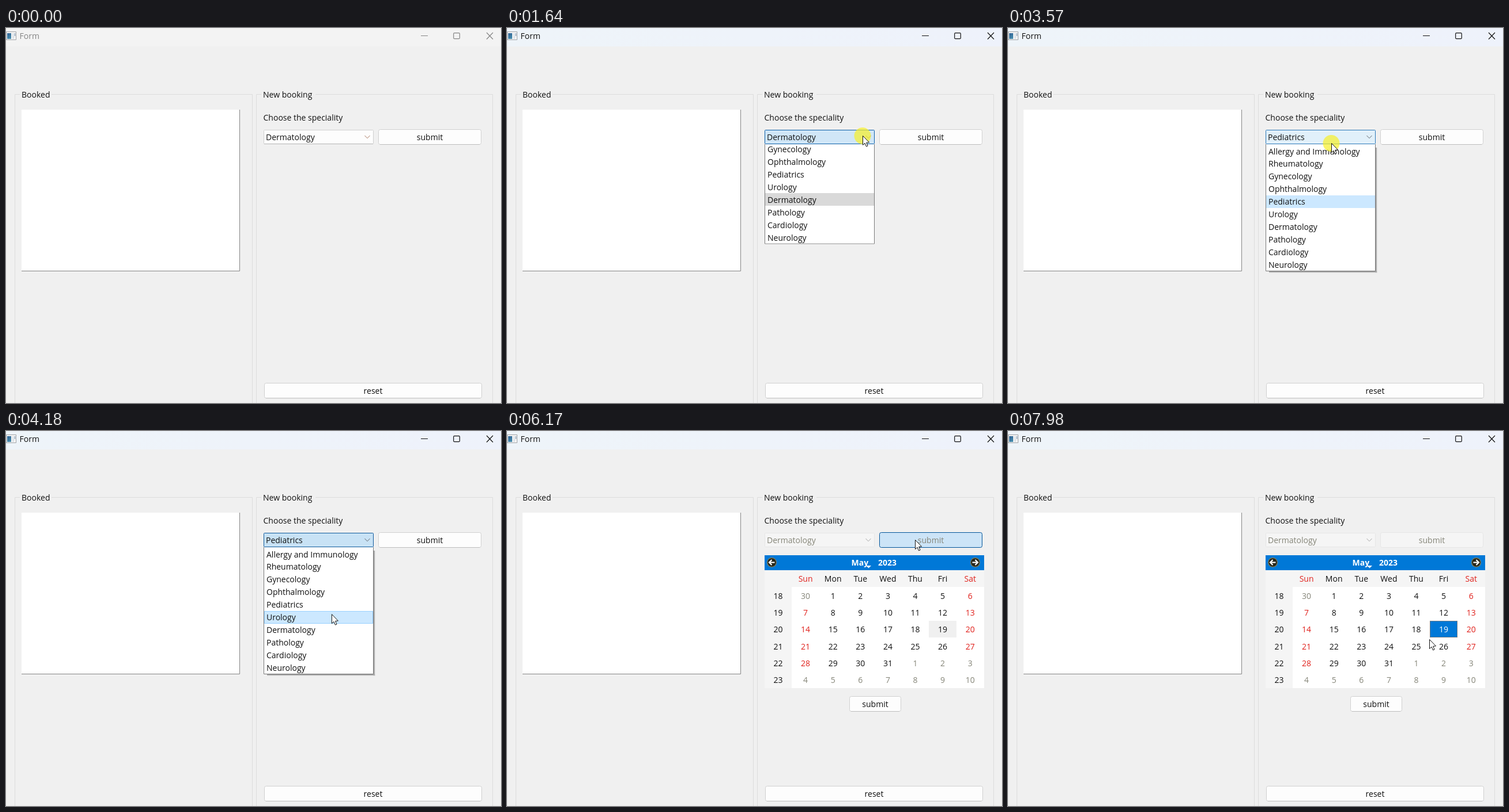
An HTML page with a canvas that plays this animation: 859 px wide and 652 px high, repeating every 8 s.

```html
<!DOCTYPE html>
<html lang="en">
<head>
<meta charset="utf-8">
<title>Booking form</title>
<style>
html, body { margin: 0; width: 100%; height: 100%; overflow: hidden; background: #f0f0f0; }
canvas { display: block; }
</style>
</head>
<body>
<canvas id="stage" width="859" height="652"></canvas>
<script>
const ctx = document.getElementById('stage').getContext('2d');
const LOOP = 8000;
const ITEMS = ['Allergy and Immunology', 'Rheumatology', 'Gynecology', 'Ophthalmology', 'Pediatrics',
  'Urology', 'Dermatology', 'Pathology', 'Cardiology', 'Neurology'];
const DAYS = ['Sun', 'Mon', 'Tue', 'Wed', 'Thu', 'Fri', 'Sat'];
const LIST_TOP = 203, LIST_H = 220, ROW_H = 21.95;
const CALENDAR_AT = 5930, SELECT_AT = 7530;

// Control looks: [fill, border]
const NORMAL = ['#fdfdfd', '#d0d0d0'];
const HOVER = ['#e0eef9', '#0078d4'];
const PRESSED = ['#cce4f7', '#005499'];
const OPEN = ['#c8e2f5', '#0f5a9c'];
const OFF = ['#f5f5f5', '#e6e6e6'];

const comboLook = [[0, NORMAL], [1230, NORMAL], [1360, HOVER], [1480, HOVER], [1640, ['#d0e6f7', '#0a5ea8']],
  [1850, OPEN], [2760, OPEN], [2950, NORMAL], [3170, NORMAL], [3300, HOVER], [3570, ['#e1f0fa', '#2a78b8']],
  [3720, OPEN], [5040, OPEN], [5200, ['#e0eef8', '#5a8fb8']], [5400, NORMAL], [5920, NORMAL], [5930, OFF]];
const submitLook = [[0, NORMAL], [5570, NORMAL], [5700, HOVER], [5800, HOVER], [5900, PRESSED], [6170, PRESSED], [6570, OFF]];
const resetLook = [[0, NORMAL], [600, NORMAL], [660, HOVER], [740, HOVER], [950, NORMAL]];

// Pointer path: [time, x, y]
const path = [[600, 735, 642], [1360, 617, 187], [1700, 617, 187], [2190, 568, 302], [2260, 568, 305],
  [2320, 568, 311], [2700, 568, 311], [3300, 561, 200], [3600, 561, 200], [4250, 565, 322], [4320, 565, 325],
  [4530, 567, 343], [5040, 567, 343], [5730, 708, 189], [6570, 708, 189], [7260, 756, 339], [7979, 756, 339], [7980, 731, 362]];
const clicks = [[1420, 1700], [2520, 2700], [3440, 3640], [4730, 4990], [5800, 6000], [7530, 7720]];
// Drop-down: [starts sliding, fully open, closes, selected item]
const menus = [[1484, 1684, 2760, 6], [3360, 3540, 5050, 4]];

const within = (t, [from, to]) => t >= from && t < to;

// Keys around time t and the progress between them
function span(keys, t) {
  const i = keys.findIndex(k => k[0] > t);
  if (i < 0) return [keys.at(-1), keys.at(-1), 0];
  if (i === 0) return [keys[0], keys[0], 0];
  const a = keys[i - 1], b = keys[i];
  return [a, b, (t - a[0]) / (b[0] - a[0])];
}

function mix(a, b, p) {
  const channel = (c, i) => parseInt(c.slice(i, i + 2), 16);
  return `rgb(${[1, 3, 5].map(i => Math.round(channel(a, i) * (1 - p) + channel(b, i) * p))})`;
}

function lookAt(keys, t) {
  const [a, b, p] = span(keys, t);
  return [0, 1].map(i => mix(a[1][i], b[1][i], p));
}

function pointerAt(t) {
  const [a, b, p] = span(path, t), e = p * p * (3 - 2 * p);
  return [a[1] + (b[1] - a[1]) * e, a[2] + (b[2] - a[2]) * e];
}

function rect(x, y, w, h, color) {
  ctx.fillStyle = color;
  ctx.fillRect(x, y, w, h);
}

function box(x, y, w, h, [fill, border], r = 0) {
  ctx.beginPath();
  ctx.roundRect(x + .5, y + .5, w - 1, h - 1, r);
  ctx.fillStyle = fill;
  ctx.fill();
  ctx.strokeStyle = border;
  ctx.stroke();
}

function line(color, ...pts) {
  ctx.beginPath();
  for (let i = 0; i < pts.length; i += 2) ctx.lineTo(pts[i], pts[i + 1]);
  ctx.strokeStyle = color;
  ctx.stroke();
}

function disc(x, y, r, color) {
  ctx.beginPath();
  ctx.arc(x, y, r, 0, 7);
  ctx.fillStyle = color;
  ctx.fill();
}

function text(s, x, y, color = '#111', align = 'left', weight = 400) {
  ctx.font = `${weight} 14px "Open Sans", "Noto Sans", sans-serif`;
  ctx.textAlign = align;
  ctx.fillStyle = color;
  ctx.fillText(s, x, y);
}

function button(label, x, y, w, h, look, color) {
  box(x, y, w, h, look, 3);
  if (look[1] === mix(NORMAL[1], NORMAL[1], 0)) line('#bdbdbd', x + 3, y + h - .5, x + w - 3, y + h - .5);
  text(label, x + w / 2, y + h / 2 + 5.5, color, 'center');
}

function titleBar(active) {
  const ink = active ? '#111' : '#858585';
  const shade = ctx.createLinearGradient(0, 0, 859, 0);
  shade.addColorStop(0, active ? '#eef4f9' : '#f3f3f3');
  shade.addColorStop(1, active ? '#eef2fb' : '#f3f3f3');
  rect(0, 0, 859, 32, shade);
  box(0, 6, 18, 15, ['#f4f4f4', '#a0a4a8']);
  const blue = ctx.createLinearGradient(2, 8, 9, 19);
  blue.addColorStop(0, '#2f5f94');
  blue.addColorStop(1, '#4b93b0');
  rect(2, 9, 7, 10, blue);
  rect(11, 9, 3, 10, '#dde3e8');
  rect(15, 9, 1, 5, '#6a8aa8');
  text('Form', 23.5, 19, ink);
  line(ink, 720, 13.5, 732, 13.5);
  ctx.lineWidth = 1.2;
  ctx.beginPath();
  ctx.roundRect(776.7, 8.7, 10.6, 10, 1.5);
  ctx.stroke();
  line(ink, 834, 8, 845, 19.5);
  line(ink, 845, 8, 834, 19.5);
  ctx.lineWidth = 1;
}

function group(label, left, right, gapEnd) {
  line('#dcdcdc', left + 9, 115.5, left + .5, 115.5, left + .5, 660);
  line('#dcdcdc', gapEnd, 115.5, right - .5, 115.5, right - .5, 660);
  text(label, left + 12, 121);
}

function combo(t, off) {
  const look = lookAt(comboLook, t);
  box(447, 177, 191, 25, look, 1);
  if (t < 1230) line('#b4b4b4', 448, 201.5, 637, 201.5);
  text(within(t, [2760, 5050]) ? ITEMS[4] : ITEMS[6], 451, 195, off ? '#858578' : '#111');
  line(off ? '#a8a8a8' : t < 1700 ? '#a87860' : '#606870', 622.5, 187, 627, 191.7, 631.5, 187);
}

function menu(t, py, [start, full, , selected]) {
  const shown = Math.min(1, (t - start) / (full - start)), sliding = shown < 1;
  const h = LIST_H * shown, top = LIST_TOP - LIST_H + h;
  const hovering = !sliding && py > LIST_TOP;
  const row = hovering ? Math.floor((py - LIST_TOP) / ROW_H) : selected;
  if (!sliding) {
    for (const [d, color] of [[2.5, '#d2d2d2'], [1.5, '#9c9c9c']]) {
      rect(453, 423, 185 + d, d, color);
      rect(638, 208, d, 215 + d, color);
    }
  }
  ctx.save();
  ctx.beginPath();
  ctx.rect(447, 202, 191, h + 1);
  ctx.clip();
  rect(447, 202, 191, h + 1, '#fff');
  const y = Math.round(top + row * ROW_H);
  rect(448, y, 189, 22, sliding ? '#d9d9d9' : '#cce8ff');
  if (hovering) box(448, y, 189, 22, ['#cce8ff', '#99d1ff']);
  ITEMS.forEach((name, i) => text(name, 452, Math.round(top + 16.5 + i * ROW_H)));
  line('#7a7a7a', 447.5, 202, 447.5, 202.5 + h, 637.5, 202.5 + h, 637.5, 202);
  ctx.restore();
}

function navButton(x, dir) {
  disc(x, 228.5, 8.5, '#85805a');
  disc(x, 228.5, 7.3, '#25261c');
  ctx.lineWidth = 2.2;
  line('#fff', x - 5 * dir, 228.5, x + 4 * dir, 228.5);
  line('#fff', x, 224, x + 4.5 * dir, 228.5, x, 233);
  ctx.lineWidth = 1;
}

function calendar(t) {
  const colX = c => 470.5 + c * 47.6, rowY = r => Math.round(262.3 + r * 29.3);
  rect(447, 216, 381, 26, '#0078d7');
  rect(447, 242, 381, 205, '#f5f5f5');
  rect(494, 271, 334, 176, '#fff');
  navButton(459.5, -1);
  navButton(812.5, 1);
  text('May', 597.5, 234, '#fff', 'left', 700);
  text('2023', 644, 234, '#fff', 'left', 700);
  ctx.beginPath();
  [[623, 234], [632, 234], [627.5, 238.5]].forEach(p => ctx.lineTo(...p));
  ctx.fillStyle = '#fff';
  ctx.fill();

  const picked = t >= SELECT_AT;
  rect(732, 330, 48, 29, picked ? '#0078d7' : '#f0f0f0');
  if (picked) {
    ctx.setLineDash([1, 1]);
    ctx.strokeStyle = '#e08238';
    ctx.strokeRect(732.5, 330.5, 47, 28);
    ctx.setLineDash([]);
  }
  const red = '#e0201b';
  DAYS.forEach((d, c) => text(d, colX(c + 1), rowY(0), c % 6 ? '#111' : red, 'center'));
  for (let r = 0; r < 6; r++) {
    text(18 + r, colX(0), rowY(r + 1), '#111', 'center');
    for (let c = 0; c < 7; c++) {
      const n = r * 7 + c, other = n < 1 || n > 31;
      const color = other ? '#858578' : n === 19 && picked ? '#fff' : c % 6 ? '#111' : red;
      text(n < 1 ? 30 : n > 31 ? n - 31 : n, colX(c + 1), rowY(r + 1), color, 'center');
    }
  }
  button('submit', 594, 461, 90, 27, lookAt([[0, NORMAL]], t));
}

function pointer(x, y) {
  ctx.save();
  ctx.translate(x + .5, y + .5);
  ctx.beginPath();
  [[0, 0], [0, 16], [3.6, 12.8], [6, 18.5], [8.6, 17.4], [6.2, 11.8], [11, 11.4]].forEach(p => ctx.lineTo(...p));
  ctx.closePath();
  ctx.fillStyle = '#fff';
  ctx.fill();
  ctx.strokeStyle = '#111';
  ctx.stroke();
  ctx.restore();
}

function draw(t) {
  const [px, py] = pointerAt(t), off = t >= CALENDAR_AT;
  rect(0, 0, 859, 652, '#f0f0f0');
  titleBar(t >= 1420);
  group('Booked', 15, 428, 79);
  group('New booking', 434.5 - .5, 845, 537);
  rect(27, 142, 379, 281, '#fff');
  line('#858585', 27, 422.5, 405.5, 422.5, 405.5, 142);
  text('Choose the speciality', 446.5, 161);
  combo(t, off);
  button('submit', 646, 176, 179, 27, lookAt(submitLook, t), off ? '#858578' : '#111');
  button('reset', 448, 617, 378, 27, lookAt(resetLook, t));
  if (off) calendar(t);
  const open = menus.find(m => within(t, [m[0], m[2]]));
  if (open) menu(t, py, open);
  if (clicks.some(c => within(t, c))) disc(px, py + .5, 14.5, 'rgba(246,240,40,.7)');
  if (t >= 600) pointer(px, py);
}

function frame() {
  draw(performance.now() % LOOP);
  requestAnimationFrame(frame);
}
frame();
</script>
</body>
</html>
```
